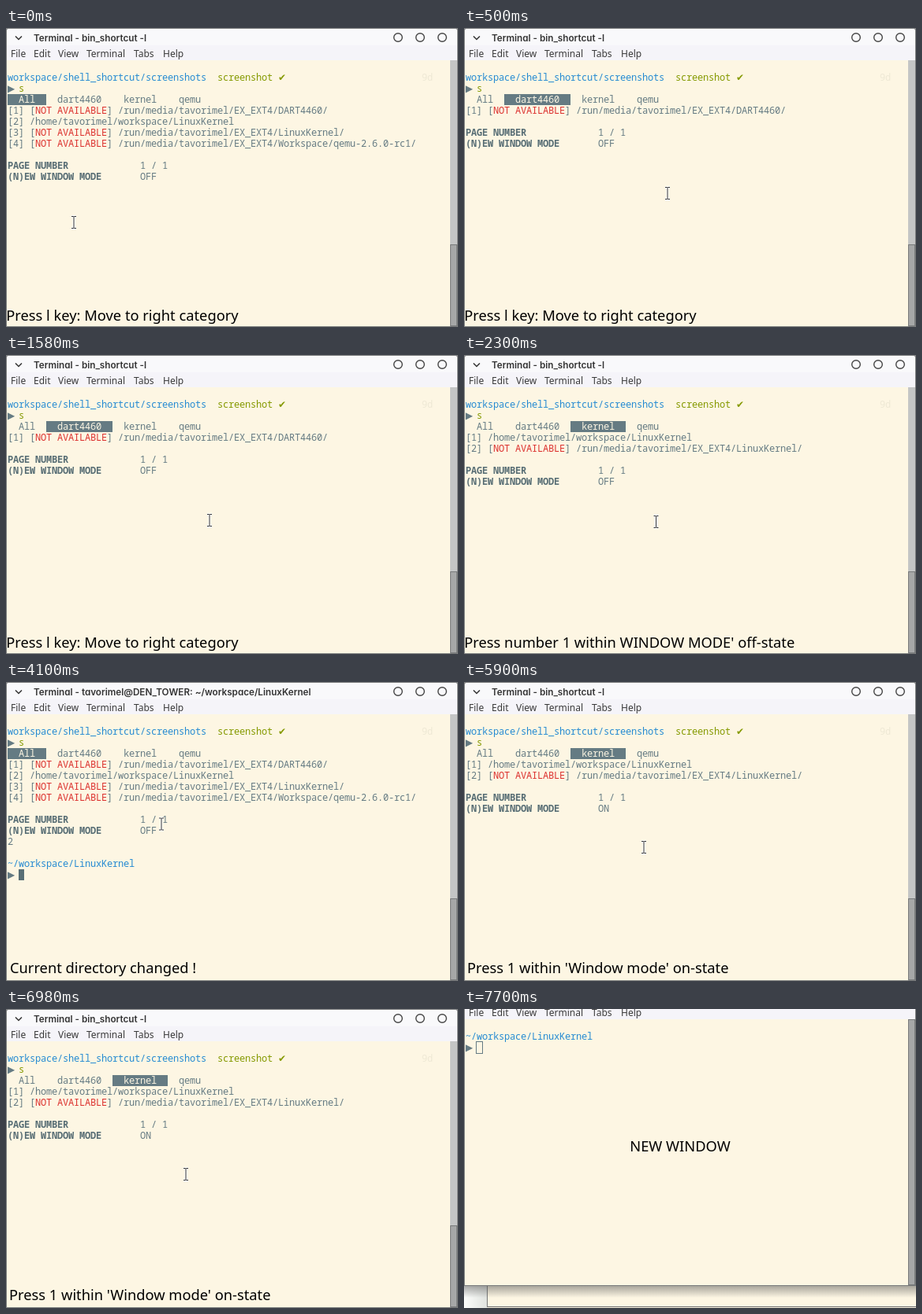
An HTML page for the animation above (8 s loop, 573x380 px).

```html
<!DOCTYPE html>
<html lang="en">
<meta charset="utf-8">
<title>Terminal shortcuts</title>
<style>
html, body { margin: 0; width: 100%; height: 100%; overflow: hidden; background: #fdf6e3 }
svg { display: block; width: 573px; height: 380px }
text { white-space: pre }
.title { font: 600 11.7px Inter, sans-serif; font-feature-settings: "cv11"; fill: #333 }
.menu { font: 12px "Noto Sans", sans-serif; fill: #3a3a3a }
.cap { font: 18.3px "Noto Sans", sans-serif; fill: #000 }
.mono { font: 12px "Noto Sans Mono", monospace; letter-spacing: -.2px; fill: #657b83 }
.mark { font: 12px "DejaVu Sans", sans-serif; fill: #657b83 }
.bold { font-weight: 700; fill: #586e75 }
.blue { fill: #268bd2 }
.green { fill: #859900 }
.red { fill: #dc322f }
.cream { fill: #fdf6e3 }
.faint { fill: #eee8d5 }
</style>
<svg id="stage" viewBox="0 0 573 380"></svg>
<script>
const stage = document.getElementById('stage');
const LOOP = 8000, ROW = 14, COL = 7, TOP = 42, LEFT = 2;

const text = (x, y, s, cls) => `<text x="${x}" y="${y}" class="${cls}">${s}</text>`;
const rect = (x, y, w, h, fill, more = '') =>
  `<rect x="${x}" y="${y}" width="${w}" height="${h}" fill="${fill}" ${more}/>`;
// Text placed on the terminal grid
const cell = (col, row, s, cls = '', font = 'mono') =>
  text(LEFT + COL * col, TOP + ROW * row + 11, s, font + ' ' + cls);

const prompt = (row, dir) => cell(0, row, dir, 'blue') + cell(0, row + 1, '▶', '', 'mark');

const tabs = ['All', 'dart4460', 'kernel', 'qemu'];
function tabBar(active) {
  let col = 0, out = '';
  tabs.forEach((name, i) => {
    const w = name.length + 4;
    if (i === active) out += rect(LEFT + COL * col, TOP + ROW * 3, COL * w, ROW, '#657b83');
    out += cell(col + 2, 3, name, i === active ? 'cream' : '');
    col += w;
  });
  return out;
}

const media = '/run/media/tavorimel/EX_EXT4/';
const dart = media + 'DART4460/', kernel = media + 'LinuxKernel/';
const home = '/home/tavorimel/workspace/LinuxKernel';
const all = [dart, home, kernel, media + 'Workspace/qemu-2.6.0-rc1/'];

function entry(path, i) {
  const row = 4 + i, index = cell(0, row, `[${i + 1}]`);
  if (path === home) return index + cell(4, row, path);
  return index + cell(4, row, '[') + cell(5, row, 'NOT AVAILABLE', 'red') + cell(18, row, '] ' + path);
}

function list(active, paths, mode = 'OFF') {
  const row = 5 + paths.length;
  return prompt(1, 'workspace/shell_shortcut/screenshots') +
    cell(38, 1, 'screenshot', 'green') + cell(49, 1, '✔', 'green', 'mark') +
    cell(75, 1, '9d', 'faint') + cell(2, 2, 's', 'green') +
    tabBar(active) + paths.map(entry).join('') +
    cell(0, row, 'PAGE NUMBER', 'bold') + cell(24, row, '1 / 1') +
    cell(0, row + 1, '(N)EW WINDOW MODE', 'bold') + cell(24, row + 1, mode);
}

function beam(x, y) {
  const d = `M${x - 3} ${y - 7.5}h2.5l.5 .5l.5 -.5h2.5M${x} ${y - 7}v14M${x - 3} ${y + 7.5}h2.5l.5 -.5l.5 .5h2.5`;
  return `<path d="${d}" fill="none" stroke="#fff" stroke-width="3"/>` +
    `<path d="${d}" fill="none" stroke="#333"/>`;
}

function frame(title, thumbTop) {
  const menu = [[6, 'File'], [35, 'Edit'], [66, 'View'], [102, 'Terminal'], [162, 'Tabs'], [199, 'Help']];
  return rect(0, 0, 573, 380, '#77797a') +
    rect(1, 1, 571, 24, '#f9f9fb', 'rx="2"') + rect(1, 22, 571, 19, '#f5f4f9') +
    rect(1, 41, 562, 338, '#fdf6e3') + rect(563, 41, 9, 338, '#c4c5c5') +
    rect(563.5, thumbTop + .5, 8, 378 - thumbTop, '#a6a7a7', 'stroke="#77797a"') +
    '<path d="M12 10.5l4 4l4 -4" fill="none" stroke="#333" stroke-width="1.5"/>' +
    [497, 525, 553].map(x => `<circle cx="${x}" cy="12" r="5.3" fill="none" stroke="#444" stroke-width="1.4"/>`).join('') +
    text(35, 17, title, 'title') + menu.map(([x, s]) => text(x, 37, s, 'menu')).join('');
}

const main = (body, caption, x, y, pointer, title = 'bin_shortcut -l') =>
  frame('Terminal - ' + title, 275) + body + text(x, y, caption, 'cap') + beam(...pointer);

function newWindow() {
  const shade = '<linearGradient id="shade" x2="0" y2="1"><stop stop-color="#555" stop-opacity=".5"/>' +
    '<stop offset="1" stop-color="#555" stop-opacity="0"/></linearGradient>' +
    '<linearGradient id="desk"><stop stop-color="#fcfdfb"/><stop offset="1" stop-color="#dfe2de"/></linearGradient>';
  return shade + rect(0, 350, 30, 30, 'url(#desk)') + rect(30, 350, 543, 30, '#fdf6e3') +
    rect(29, 352, 1, 27, '#77797a') + rect(30, 378, 543, 1, '#66686a') +
    rect(0, 352, 573, 15, 'url(#shade)') +
    '<g transform="translate(0 -28)">' + frame('Terminal', 41) +
    prompt(1, '~/workspace/LinuxKernel') +
    rect(15.5, 69.5, 8, 15, 'none', 'stroke="#657b83"') + '</g>' +
    text(210.3, 181, 'NEW WINDOW', 'cap');
}

const right = 'Press l key: Move to right category';
const changed = list(0, all) + cell(0, 11, '2') + prompt(13, '~/workspace/LinuxKernel') +
  rect(16, 238, 7, 14, '#586e75');

const scenes = [
  [0, main(list(0, all), right, .3, 372, [86, 247])],
  [500, main(list(1, [dart]), right, .3, 372, [258, 210])],
  [2300, main(list(2, [home, kernel]), "Press number 1 within WINDOW MODE' off-state", .3, 372, [243.5, 212])],
  [4100, main(changed, 'Current directory changed !', 5, 370, [197, 180.5], 'tavorimel@DEN_TOWER: ~/workspace/LinuxKernel')],
  [5900, main(list(2, [home, kernel], 'ON'), "Press 1 within 'Window mode' on-state", 4, 370, [228, 210])],
  [7700, newWindow()]
];

let shown;
function draw(now) {
  const t = now % LOOP;
  const scene = scenes.findLast(([start]) => t >= start);
  if (scene !== shown) stage.innerHTML = (shown = scene)[1];
  requestAnimationFrame(draw);
}
draw(performance.now());
</script>
</html>
```
